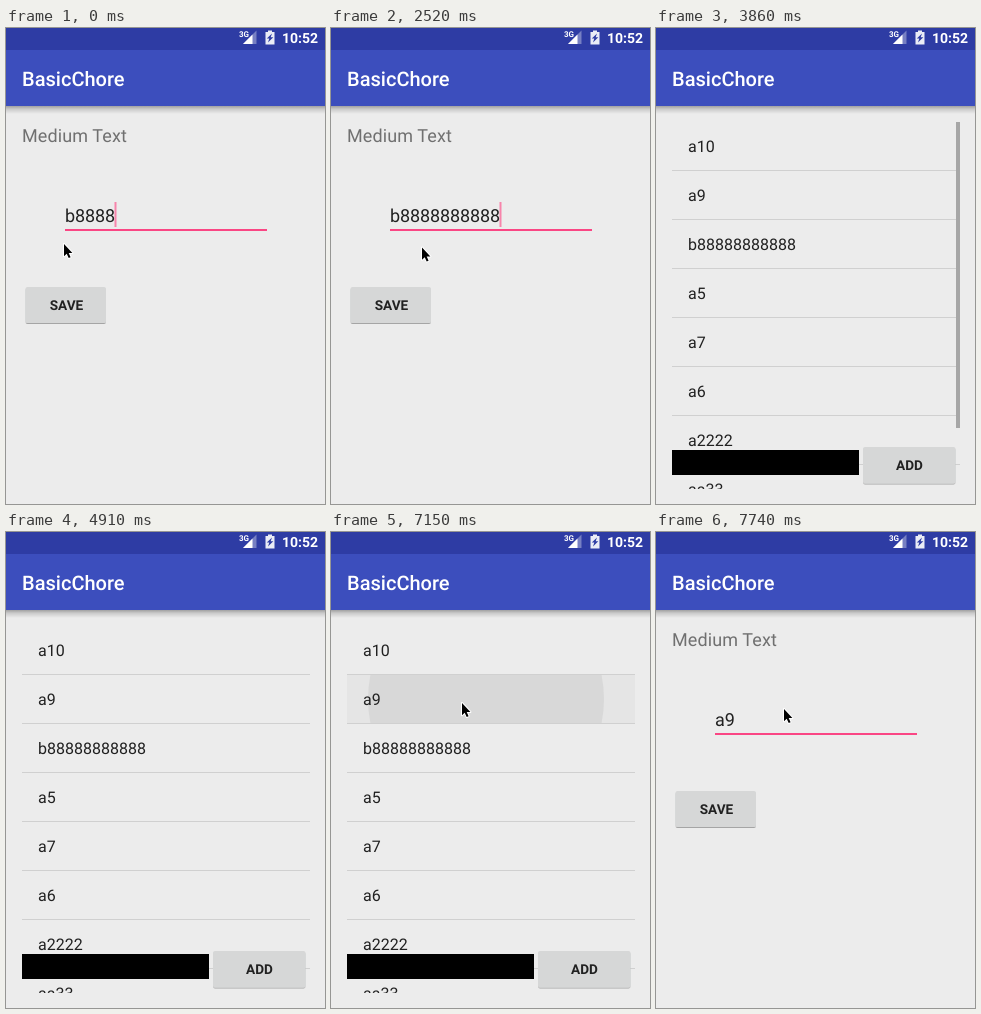
An HTML page for the animation above (8 s loop, 319 by 476 pixels).

```html
<!DOCTYPE html>
<html lang="en">
<head>
<meta charset="utf-8">
<title>To-do list</title>
<style>
html, body { margin: 0; width: 100%; height: 100%; overflow: hidden; background: #ececec; }
svg { display: block; width: 100vw; height: 100vh; font-family: Roboto, sans-serif; }
text { white-space: pre; text-rendering: geometricPrecision; }
.label { font-size: 13.6px; font-weight: 700; text-anchor: middle; fill: #212121; }
</style>
</head>
<body>
<svg viewBox="0 0 319 476" xmlns="http://www.w3.org/2000/svg">
  <defs>
    <linearGradient id="shade" x2="0" y2="1">
      <stop offset="0" stop-color="#000" stop-opacity=".32"/>
      <stop offset=".4" stop-color="#000" stop-opacity=".14"/>
      <stop offset="1" stop-color="#000" stop-opacity="0"/>
    </linearGradient>
    <filter id="lift" x="-10%" y="-20%" width="120%" height="150%">
      <feDropShadow dx="0" dy="1" stdDeviation=".6" flood-opacity=".3"/>
    </filter>
    <clipPath id="listClip"><rect x="16" y="94" width="288" height="367"/></clipPath>
    <clipPath id="rowClip"><rect x="16" y="143" width="288" height="48"/></clipPath>
    <g id="frame">
      <rect width="319" height="476" fill="#ececec"/>
      <rect y="78" width="319" height="8" fill="url(#shade)"/>
      <rect width="319" height="78" fill="#3c4ebd"/>
      <rect width="319" height="22" fill="#2e3ca4"/>
      <text x="16" y="58" font-size="20" font-weight="500" fill="#fff">BasicChore</text>
    </g>
  </defs>

  <g id="list">
    <use href="#frame"/>
    <g id="ripple" clip-path="url(#rowClip)">
      <rect x="16" y="143" width="288" height="48" fill="#e5e5e5"/>
      <circle id="wave" cx="155" cy="167" r="118" fill="#d8d8d8"/>
    </g>
    <g id="rows" clip-path="url(#listClip)" font-size="16" fill="#212121"></g>
    <rect id="scrollbar" x="300" y="94" width="4" height="306" fill="#a6a6a6"/>
    <rect x="16" y="422" width="187" height="25"/>
    <rect x="207" y="419" width="92.5" height="36.5" rx="2" fill="#d6d7d7" filter="url(#lift)"/>
    <text class="label" x="253.5" y="442">ADD</text>
  </g>

  <g id="editor">
    <use href="#frame"/>
    <text x="16" y="114" font-size="18" letter-spacing=".1" fill="#707070">Medium Text</text>
    <text id="field" x="59" y="194" font-size="18" letter-spacing="-.11" fill="#212121"></text>
    <rect id="caret" y="174" width="2" height="25" fill="#ff4081" opacity=".6"/>
    <rect x="59" y="201" width="202" height="2" fill="#fa4684"/>
    <rect id="save" x="19.5" y="259" width="80.5" height="36" rx="2" filter="url(#lift)"/>
    <text class="label" x="60.5" y="282">SAVE</text>
  </g>

  <g fill="#fff">
    <text x="233" y="9" font-size="8" font-weight="700">3G</text>
    <path d="M250.5 2.5V16H237Z" opacity=".35"/>
    <path d="M246.5 6.5V16H237Z"/>
    <path d="M262 2.5H266V4H268.5V16.5H259.5V4H262Z" opacity=".9"/>
    <path d="M266 5.5L260.8 10.5H263.3L262 14.5L267.3 9.2H264.7Z" fill="#2e3ca4"/>
    <text x="276" y="15" font-size="14" font-weight="700">10:52</text>
  </g>

  <path id="pointer" d="M.5 0V12.2L3.2 9.7L5.2 14L7.1 13.2L5.2 9H8.9Z"
        fill="#000" stroke="#fff" stroke-width="2" stroke-linejoin="round" paint-order="stroke"/>
</svg>
<script>
const LOOP = 8000, STEP = 150;
const $ = id => document.getElementById(id);
const set = (el, attrs) => { for (const k in attrs) el.setAttribute(k, attrs[k]); };
const show = (el, on) => set(el, { display: on ? 'inline' : 'none' });

// Value of the last key at or before t.
const at = (track, t) => track.reduce((v, key) => key[0] <= t ? key : v);
// How many of n regular ticks have passed, the first one at start.
const ticks = (t, start, n) => Math.max(0, Math.min(n, Math.floor((t - start) / STEP) + 1));

const pointerTrack = [
  [0, 57.5, 216], [300, 61, 217], [445, 68, 218], [595, 77, 219], [740, 86, 219], [890, 90.5, 219.5],
  [2820, 82, 243], [2970, 70, 276], [3120, 68, 288], [3270, 88.5, 281.5],
  [6400, 168, 155.5], [6550, 157, 159], [6700, 140, 167], [6850, 130.5, 171],
  [7740, 127.5, 177]
];
const caretTrack = [
  [0, 1], [445, 0], [890, 1], [1340, 0], [1630, 1], [3270, 0], [7440, 1], [7740, 0]
];

const items = ['a10', 'a9', 'b88888888888', 'a5', 'a7', 'a6', 'a2222', 'aa33'];
$('rows').innerHTML = items.map((name, i) => {
  const y = 94 + 49 * i;
  return `<text x="32" y="${y + 30}">${name}</text>` +
    `<rect x="16" y="${y + 48}" width="288" height="1" fill="#d0d0d0"/>`;
}).join('');

function draw(t) {
  const reopened = t >= 7290;
  const text = reopened ? 'a9' : 'b' + '8'.repeat(4 + ticks(t, 1630, 4) + ticks(t, 2370, 3));
  $('field').textContent = text;
  set($('caret'), { x: 58.5 + 10 * text.length });
  show($('caret'), at(caretTrack, t)[1]);

  // The editor window slides and fades while closing and opening.
  const closing = t >= 3710 && t < 3860;
  const opening = reopened && t < 7440;
  show($('editor'), t < 3860 || reopened);
  set($('editor'), {
    opacity: closing ? 0.35 : opening ? 0.65 : 1,
    transform: `translate(0 ${closing ? 18 : opening ? 12 : 0})`
  });
  const press = reopened ? 0 : ticks(t, 3420, 2);
  set($('save'), { fill: ['#d6d7d7', '#cfd1d0', '#c8cac9'][press] });

  show($('ripple'), t >= 7150 && t < 7440);
  set($('wave'), { r: reopened ? 150 : 118 });
  set($('scrollbar'), { opacity: 1 - ticks(t, 4760, 2) / 2 });

  const [, x, y] = at(pointerTrack, t);
  set($('pointer'), { transform: `translate(${x} ${y})` });
  show($('pointer'), t < 3860 || t >= 6400);
}

const start = performance.now();
function tick() {
  draw((performance.now() - start) % LOOP);
  requestAnimationFrame(tick);
}
draw(0);
requestAnimationFrame(tick);
</script>
</body>
</html>
```
